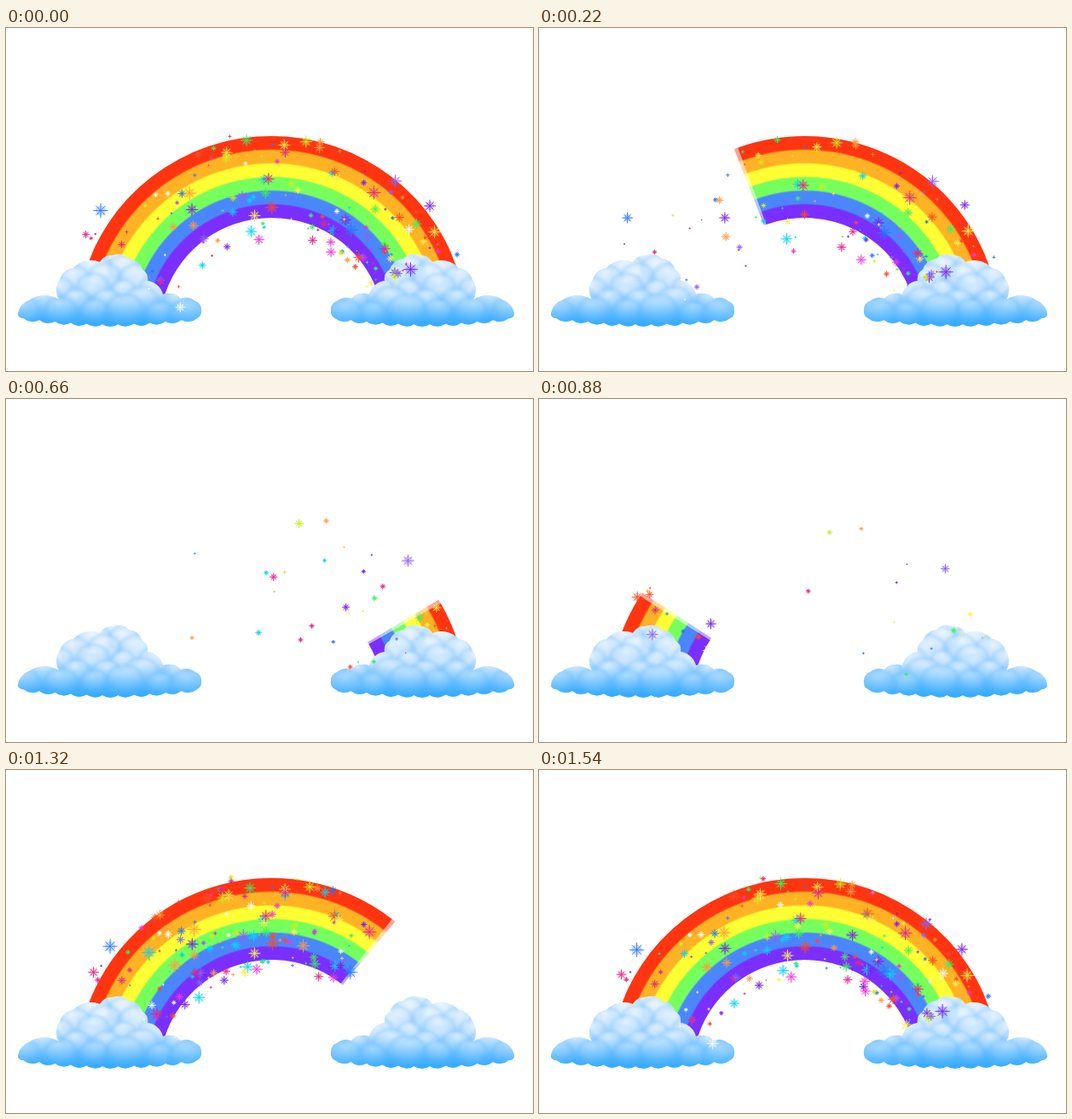
Animation, 618 px wide and 403 px high, one loop 1.65 s. Source, as an HTML page:

```html
<!DOCTYPE html>
<html lang="en">
<head>
<meta charset="utf-8">
<title>Rainbow</title>
<style>
html, body { margin: 0; width: 100%; height: 100%; overflow: hidden; background: #fff; }
svg { display: block; width: 100vw; height: 100vh; }
</style>
</head>
<body>
<svg viewBox="0 0 618 403" preserveAspectRatio="none">
  <defs>
    <radialGradient id="bands" gradientUnits="userSpaceOnUse" cx="0" cy="0" r="226"></radialGradient>
    <linearGradient id="sky" gradientUnits="userSpaceOnUse" x1="0" y1="265" x2="0" y2="351">
      <stop offset="0" stop-color="#e0f0fe"/>
      <stop offset=".5" stop-color="#b2daff"/>
      <stop offset=".8" stop-color="#7cc6ff"/>
      <stop offset="1" stop-color="#42afff"/>
    </linearGradient>
    <linearGradient id="under" gradientUnits="userSpaceOnUse" x1="0" y1="310" x2="0" y2="351">
      <stop offset="0" stop-color="#4cb4ff" stop-opacity="0"/>
      <stop offset="1" stop-color="#2fa8ff" stop-opacity=".85"/>
    </linearGradient>
    <radialGradient id="puff" fx=".45" fy=".25">
      <stop offset="0" stop-color="#f4faff" stop-opacity=".75"/>
      <stop offset=".55" stop-color="#d4eafe" stop-opacity=".55"/>
      <stop offset=".85" stop-color="#88c8fe" stop-opacity=".45"/>
      <stop offset="1" stop-color="#7cc2fd" stop-opacity="0"/>
    </radialGradient>
    <filter id="soft"><feGaussianBlur stdDeviation="1.8"/></filter>
    <clipPath id="edge"><path id="outline"/></clipPath>
    <g id="cloud" clip-path="url(#edge)">
      <rect y="255" width="240" height="110" fill="url(#sky)"/>
      <g id="puffs" fill="url(#puff)" filter="url(#soft)"></g>
      <rect y="255" width="240" height="110" fill="url(#under)"/>
    </g>
  </defs>
  <g transform="translate(311.5 353) scale(1.012 1)" fill="url(#bands)">
    <path id="fringe" opacity=".45"/>
    <path id="bow"/>
  </g>
  <use href="#cloud"/>
  <use href="#cloud" transform="translate(610) scale(-1 1)"/>
  <g id="stars"></g>
</svg>
<script>
const $ = id => document.getElementById(id);
const STEP = 110, COUNT = 15;
const OUTER = 226, INNER = 130, END = 76;

function add(parent, name, attrs) {
  const el = document.createElementNS('http://www.w3.org/2000/svg', name);
  for (const key in attrs) el.setAttribute(key, attrs[key]);
  return parent.appendChild(el);
}

let seed = 41;
function rand() {
  seed = (seed + 0x6D2B79F5) | 0;
  let v = Math.imul(seed ^ (seed >>> 15), 1 | seed);
  v = (v + Math.imul(v ^ (v >>> 7), 61 | v)) ^ v;
  return ((v ^ (v >>> 14)) >>> 0) / 4294967296;
}
const spread = () => (rand() + rand() + rand()) / 1.5 - 1;
const clamp = deg => Math.max(-END, Math.min(END, deg));
const dir = deg => [Math.sin(deg * Math.PI / 180), -Math.cos(deg * Math.PI / 180)];
const polar = (r, deg) => dir(deg).map(v => v * r);

// Equal bands from inside to outside
const band = (OUTER - INNER) / 6;
['#7a2fff', '#4a87ff', '#76ff5c', '#ffff33', '#ffb224', '#ff3512'].forEach((color, i) => {
  for (const r of [i * band + 1, (i + 1) * band - 1])
    add($('bands'), 'stop', { offset: (INNER + r) / OUTER, 'stop-color': color });
});

// Cloud: bulging arcs through a few top points, then a scalloped base
const rim = [[14, 337], [27, 320], [62, 319], [63, 296], [79, 282], [110, 275], [125, 267],
  [144, 271], [160, 284], [166, 297], [184, 313], [205, 318], [222, 321], [229, 331]];
for (let i = 0; i <= 11; i++)
  rim.push([224 - i * 18.5, 341 + 7 * Math.sin(i / 11 * Math.PI)]);
$('outline').setAttribute('d', rim.map((p, i) => {
  const q = rim[(i + 1) % rim.length];
  const r = 0.9 * Math.hypot(q[0] - p[0], q[1] - p[1]);
  return (i ? '' : 'M' + p) + `A${r} ${r} 0 0 1 ${q}`;
}).join('') + 'Z');

// Puffs fill the cloud in rows, wider towards the base
for (let row = 0; row < 5; row++) {
  const n = 2 + row, half = 18 + 20 * row;
  for (let i = 0; i < n; i++) {
    const r = 13 + 9 * rand();
    add($('puffs'), 'ellipse', {
      cx: 120 + half * (2 * i / (n - 1) - 1) + 8 * spread(),
      cy: 282 + 13 * row + 5 * spread(), rx: r * 1.25, ry: r
    });
  }
}

// Front edge in degrees from the top
const eraseAt = k => -60 + 20 * k;
const growAt = k => -7.3 + 23.9 * (k - 10) - 0.6 * (k - 10) ** 2;

function sector(from, to) {
  const a = clamp(from), b = clamp(to);
  if (a >= b) return '';
  return `M${polar(OUTER, a)}A${OUTER} ${OUTER} 0 0 1 ${polar(OUTER, b)}` +
    `L${polar(INNER, b)}A${INNER} ${INNER} 0 0 0 ${polar(INNER, a)}Z`;
}
function bowPath(k, grow) {
  if (k === 0) return sector(-END, END);
  return k < 7 ? sector(eraseAt(k) - grow, END) : sector(-END, growAt(k) + grow);
}

const colors = ['#08d4f4', '#2878f4', '#7a1fe8', '#ee38dd', '#ff4a24', '#ff9a3c',
  '#c8f01c', '#3cf05a', '#fff04a', '#ffffff', '#8c62f2', '#e02884'];
const layers = colors.map(color => ({
  glow: add($('stars'), 'path', { fill: color, opacity: 0.28 }),
  rays: add($('stars'), 'path', { stroke: color, 'stroke-width': 0.9, fill: 'none' })
}));

// Stars leave the growing edge, fly away from the arc and fall
const stars = Array.from({ length: 250 }, () => {
  const deg = -68 + 138 * rand(), r = 122 + 110 * rand();
  const [ux, uy] = dir(deg);
  const out = (r - 178) / 22 + 3 * spread(), side = 3.5 * spread();
  return {
    x: 311.5 + ux * r, y: 353 + uy * r,
    vx: ux * out - uy * side, vy: uy * out + ux * side - 1, g: 0.75,
    born: 10 + (deg + 7) / 23 + 1.6 * rand() - 0.4,
    life: 2 + 11 * rand() ** 1.7, size: 1.2 + 7.5 * rand() ** 1.8,
    color: Math.floor(rand() * colors.length)
  };
});

const num = v => v.toFixed(1);
const ray = (x, y, dx, dy) =>
  `M${num(x - dx)} ${num(y - dy)}L${num(x + dx)} ${num(y + dy)}`;

function drawStars(k) {
  const rays = colors.map(() => ''), glow = colors.map(() => '');
  for (const s of stars) {
    const age = ((k - s.born) % COUNT + COUNT) % COUNT;
    const x = s.x + s.vx * age, y = s.y + s.vy * age + s.g * age * age / 2;
    if (age > s.life || y > 330) continue;
    const r = s.size * Math.min(1, 0.4 + 1.6 * (1 - age / s.life)), q = r * 0.65;
    rays[s.color] += ray(x, y, r, 0) + ray(x, y, 0, r);
    if (r < 2.2) continue;
    rays[s.color] += ray(x, y, q, q) + ray(x, y, q, -q);
    const c = num(r * 0.7);
    glow[s.color] += `M${num(x - c)} ${num(y)}a${c} ${c} 0 1 0 ${2 * c} 0a${c} ${c} 0 1 0 ${-2 * c} 0`;
  }
  layers.forEach((layer, i) => {
    layer.rays.setAttribute('d', rays[i]);
    layer.glow.setAttribute('d', glow[i]);
  });
}

let shown = -1;
function draw(time) {
  const k = Math.floor(time / STEP) % COUNT;
  if (k === shown) return;
  shown = k;
  $('bow').setAttribute('d', bowPath(k, 0));
  $('fringe').setAttribute('d', bowPath(k, 1.2));
  drawStars(k);
}
function tick(now) {
  draw(now);
  requestAnimationFrame(tick);
}
draw(0);
requestAnimationFrame(tick);
</script>
</body>
</html>
```
